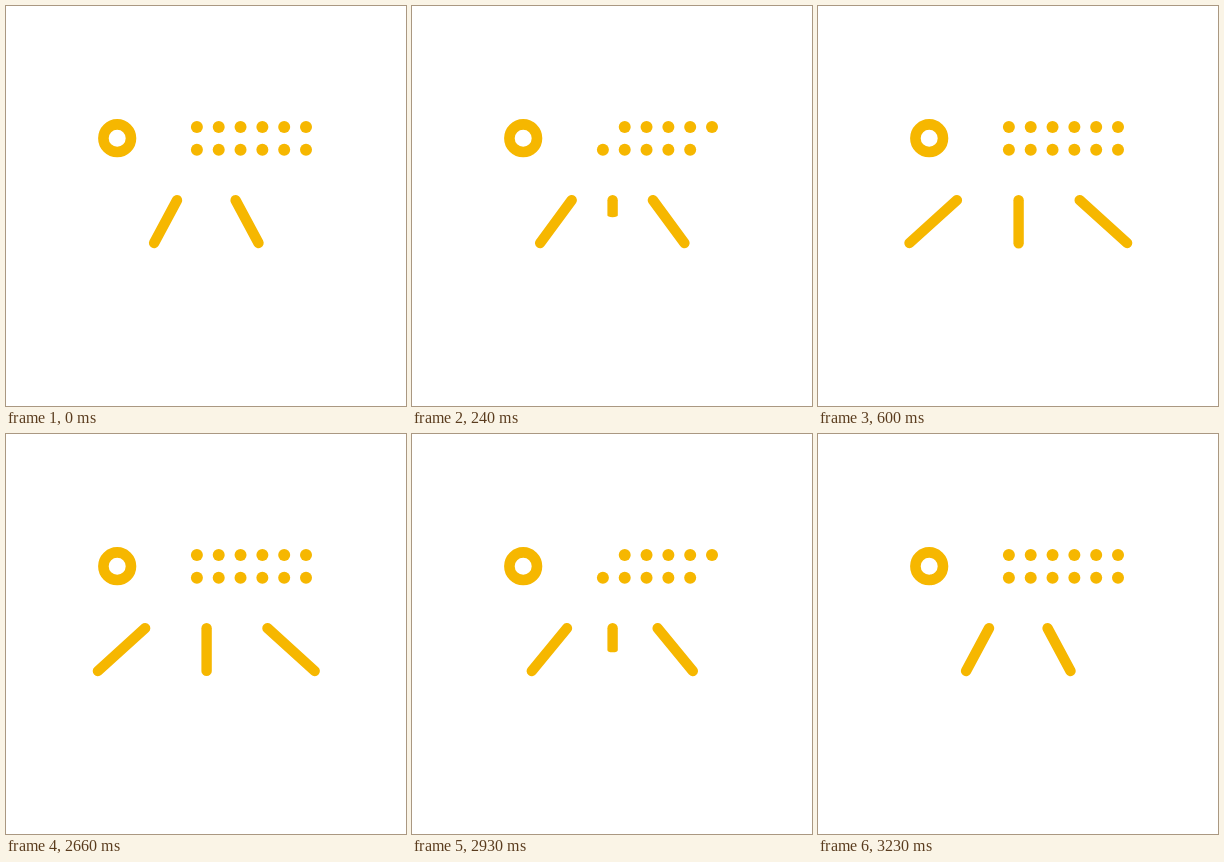
These frames come from a looping animation (400x400 px, 4760 ms). An HTML page:

```html
<!DOCTYPE html>
<html lang="en">
<head>
<meta charset="utf-8">
<title>Fanning lines</title>
<style>
  html, body { margin: 0; width: 100%; height: 100%; overflow: hidden; background: #fff; }
  svg { display: block; width: 100%; height: 100%; }
</style>
</head>
<body>
<svg viewBox="0 0 400 400" fill="#f6b700">
  <circle cx="111.2" cy="132.2" r="13.8" fill="none" stroke="#f6b700" stroke-width="10.6"/>
  <g id="dots"></g>
  <g stroke="#f6b700" stroke-width="10.4" stroke-linecap="round">
    <line id="left" y1="194.2" y2="237"/>
    <line id="right" y1="194.2" y2="237"/>
  </g>
  <path id="middle"/>
</svg>
<script>
const LOOP = 4760, STEP = 30, MOVE = 600, CLOSE_AT = 2630;
const AXIS = 200.3;
const COLUMNS = 6, PITCH = 21.82;
const byId = id => document.getElementById(id);
const [left, right, middle] = ['left', 'right', 'middle'].map(byId);

const dots = Array.from({ length: COLUMNS * 2 }, (_, i) => {
  const dot = document.createElementNS('http://www.w3.org/2000/svg', 'circle');
  dot.setAttribute('cx', 190.9 + (i % COLUMNS) * PITCH);
  dot.setAttribute('cy', i < COLUMNS ? 121 : 143.8);
  dot.setAttribute('r', 6);
  return byId('dots').appendChild(dot);
});

// Hidden intervals per dot index: [opening], [closing]
const pair = [[180, 540], [2840, 3200]];
const late = [[360, 540], [3020, 3200]];
const blinks = { 0: pair, 3: late, 11: pair };

const lerp = (a, b, p) => a + (b - a) * p;
const smooth = u => u * u * (3 - 2 * u);
const ramp = (t, start) => smooth(Math.min(1, Math.max(0, (t - start) / MOVE)));

function setLine(line, side, p) {
  line.setAttribute('x1', AXIS + side * lerp(29.3, 61.4, p));
  line.setAttribute('x2', AXIS + side * lerp(52.2, 108.8, p));
}

function middlePath(p) {
  if (p <= 0) return '';
  const r = 5.2, x = 200.6, top = 194.2, bottom = top + 43 * p;
  return `M${x - r} ${top}A${r} ${r} 0 0 1 ${x + r} ${top}V${bottom}` +
         `A${r} ${r * p} 0 0 1 ${x - r} ${bottom}Z`;
}

function draw(t) {
  const p = ramp(t, 0) - ramp(t, CLOSE_AT);
  setLine(left, -1, p);
  setLine(right, 1, p);
  middle.setAttribute('d', middlePath(p));
  for (const [i, spans] of Object.entries(blinks)) {
    const hidden = spans.some(([from, to]) => t >= from && t < to);
    dots[i].setAttribute('visibility', hidden ? 'hidden' : 'visible');
  }
}

const start = performance.now();
function tick() {
  const t = (performance.now() - start) % LOOP;
  // Poses advance in 30 ms steps; closing falls on its own step grid.
  const origin = t < CLOSE_AT ? 0 : CLOSE_AT;
  draw(origin + Math.floor((t - origin) / STEP) * STEP);
  requestAnimationFrame(tick);
}
tick();
</script>
</body>
</html>
```
